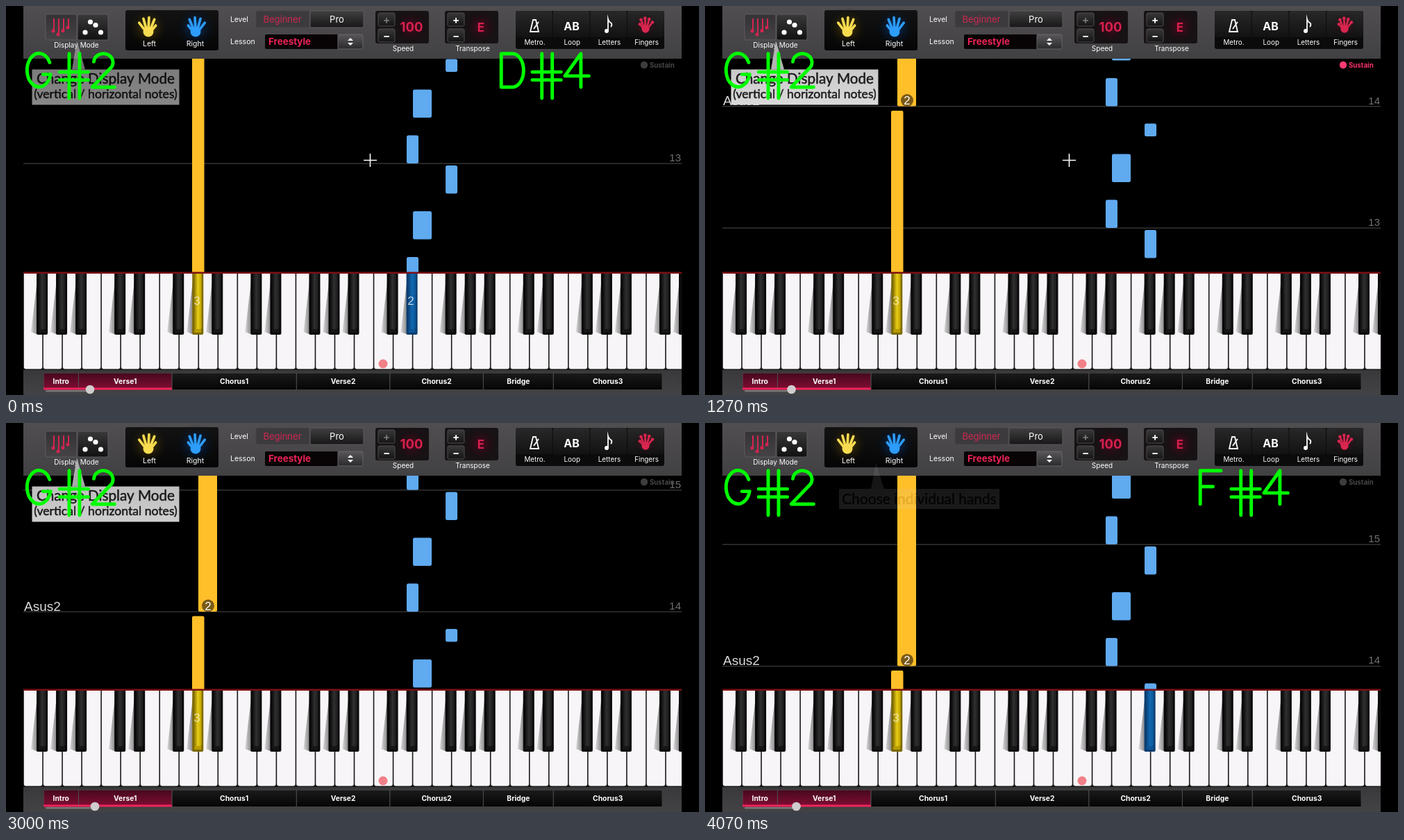
Recreate the animation shown at these times as an HTML page with a canvas. Size 998 px wide and 561 px high, loop 4.14 s.

```html
<!DOCTYPE html>
<html>
<head>
<meta charset="utf-8">
<style>
html, body { margin: 0; width: 100%; height: 100%; overflow: hidden; background: #000; }
canvas { display: block; }
</style>
</head>
<body>
<canvas id="stage" width="998" height="561"></canvas>
<script>
const stage = document.getElementById('stage');
const main = stage.getContext('2d'), layer = stage.cloneNode().getContext('2d');
let c = main;

const LOOP = 4140, STEP = 200 / 3, SPEED = 4.9, BAR = 175.5, HIT = 384, KEY = 28.03;
const PINK = '#ee2357', ORANGE = '#ffbf29', BLUE = '#60aaf0';
const UI = 'Inter, sans-serif', SANS = '"Liberation Sans", Arial, sans-serif', LATO = 'Lato, sans-serif';

// single-stroke letters, 21 units tall, baseline at 0
const GLYPHS = {
  G: 'M17.2-15.5A7.5 10.5 0 1 0 17.8-8H13',
  D: 'M4 0V-21H11A7 10.5 0 0 1 11 0Z',
  E: 'M17-21H4V0H17M4-11H12',
  F: 'M17-21H4V0M4-11H12',
  '#': 'M9-21V7M15.5-21V7M3-9.5H21M3-4.5H21',
  2: 'M4-16A6 5.5 0 1 1 15-12.5L3 0H17',
  4: 'M13 0V-21L3-7H18'
};

// each bar repeats three evenly spaced notes
const notes = [];
for (let bar = 0; bar < 4; bar++) {
  ['D#4', 'E 4', 'F#4'].forEach((name, i) => {
    const h = i === 2 && bar % 2 ? 18.5 : 40.5, black = i !== 1;
    notes.push({
      name, h, black,
      key: 20 + i,
      x: 577 + i * KEY - (black ? 0 : 19),
      w: black ? 17 : 27,
      y: 402.5 - 66 * i - BAR * bar - h,
      finger: bar + i ? '' : '2'
    });
  });
}

const clamp = v => Math.max(0, Math.min(1, v));
const smooth = v => v * v * (3 - 2 * v);

function grad(x0, y0, x1, y1, ...colors) {
  const g = c.createLinearGradient(x0, y0, x1, y1);
  colors.forEach((color, i) => g.addColorStop(i / (colors.length - 1), color));
  return g;
}
const down = (y, h, ...colors) => grad(0, y, 0, y + h, ...colors);

function box(x, y, w, h, fill, r = 0, border) {
  c.beginPath();
  c.roundRect(x, y, w, h, r);
  c.fillStyle = fill;
  c.fill();
  if (border) { c.strokeStyle = border; c.lineWidth = 1; c.stroke(); }
}

function dot(x, y, r, fill) {
  c.beginPath();
  c.arc(x, y, r, 0, 7);
  c.fillStyle = fill;
  c.fill();
}

function shape(d, fill) {
  c.fillStyle = fill;
  c.fill(new Path2D(d));
}

function stroke(d, color, width) {
  c.strokeStyle = color;
  c.lineWidth = width;
  c.stroke(new Path2D(d));
}

function text(s, x, y, size, color = '#fff', align = 'center', weight = '', font = UI) {
  c.font = `${weight} ${size}px ${font}`;
  c.textAlign = align;
  c.fillStyle = color;
  c.fillText(s, x, y);
}

function glow(x, y, r, color) {
  const g = c.createRadialGradient(x, y, 0, x, y, r);
  g.addColorStop(0, color);
  g.addColorStop(1, 'transparent');
  c.fillStyle = g;
  c.fillRect(x - r, y - r, 2 * r, 2 * r);
}

// palm with four fanned fingers and a thumb; a negative scale mirrors it
function hand(x, y, scale, color, tips) {
  c.save();
  c.translate(x, y);
  c.scale(scale, Math.abs(scale));
  c.lineCap = 'round';
  for (let i = 0; i < 5; i++) {
    const a = -2.55 + i * .52, r = i === 4 ? 12 : 16;
    const fx = r * Math.cos(a), fy = 5 + r * 1.1 * Math.sin(a);
    stroke(`M${i * 2.5 - 5} 6L${fx} ${fy}`, color, 3.6);
    if (tips) dot(fx, fy, 3, color);
  }
  c.beginPath();
  c.ellipse(0, 8, 7.5, 7.5, 0, 0, 7);
  c.fillStyle = color;
  c.fill();
  c.restore();
}

function stepper(x, label, caption, size, plusColor) {
  box(x, 7, 77, 47, '#171315', 3);
  glow(x + 52, 30, 26, 'rgba(140,0,42,.5)');
  ['+', '−'].forEach((s, i) => {
    const y = 10 + i * 23;
    box(x + 4, y, 24, 19, down(y, 19, '#393839', '#151515'), 2, '#4c4c4c');
    text(s, x + 16, y + 15, 15, i ? '#fff' : plusColor, 'center', 'bold');
  });
  text(label, x + 52, 37, size, '#d81f4e', 'center', 'bold');
  text(caption, x + 40, 65, 10);
}

function toolbar() {
  box(25, 0, 948, 76, down(0, 76, '#504e51', '#49474a', '#414042'));

  box(57, 12, 45, 37, down(12, 37, '#343234', '#454345'), 2, '#5d5b5d');
  box(103, 12, 44, 37, down(12, 37, '#3a393a', '#111'), 2, '#5d5b5d');
  for (let i = 0; i < 4; i++) {
    const x = 69 + i * 7, y = 36 + 5 * Math.sin(i * 1.6);
    stroke(`M${x} 18V${y}`, '#d42450', 2);
    dot(x - 1, y, 2.5, '#d42450');
    dot(114 + i * 7.5, i === 1 ? 23 : 31 + 7 * Math.cos(i * Math.PI / 1.5), 3.6, '#fff');
  }
  text('Display Mode', 101.5, 60, 10);

  box(172, 6, 134, 58, down(6, 58, '#131313', '#050505'), 3);
  glow(205, 31, 30, 'rgba(180,140,0,.45)');
  glow(273, 31, 30, 'rgba(0,95,220,.5)');
  hand(205, 29, 1, '#f8dc50');
  hand(273, 29, -1, '#2d9cfa');
  text('Left', 206.5, 58, 10.5);
  text('Right', 272.5, 58, 10.5);

  text('Level', 323, 23, 10.3, '#fff', 'left');
  text('Lesson', 323, 55, 10.5, '#fff', 'left');
  box(360, 7, 77, 24, '#3c3a3d', 2, '#484649');
  box(438, 7, 77, 24, down(7, 24, '#414041', '#171717'), 2, '#5d5b5d');
  text('Beginner', 398, 24, 13, '#d02650');
  text('Pro', 476.5, 24, 13);
  box(373, 41, 105, 21, '#080406', 2);
  box(478, 41, 36, 21, down(41, 21, '#59575a', '#2b2a2c'), 2, '#666');
  text('Freestyle', 378, 56, 13.4, PINK, 'left', 'bold');
  shape('M492 50h8l-4-4zM492 53h8l-4 4z', '#fff');

  stepper(532, '100', 'Speed', 18.5, '#777');
  stepper(632, 'E', 'Transpose', 17, '#fff');

  box(734, 7, 214, 55, '#0b0b0b', 3);
  ['Metro.', 'Loop', 'Letters', 'Fingers'].forEach((s, i) => {
    const x = 734 + i * 53.7;
    box(x, 7, 52.7, 38, down(7, 38, '#282828', '#121212'), 2);
    text(s, x + 27.5, 55.5, 9.9);
  });
  stroke('M759 20L755 37H767L763 20ZM760 33L767 23', '#fff', 1.8);
  text('AB', 814.5, 34.5, 16, '#fff', 'center', 'bold');
  stroke('M867 36V19Q868 23 872 25Q873 28 871 30', '#fff', 1.8);
  dot(865, 36, 3, '#fff');
  glow(921, 28, 20, 'rgba(170,0,50,.4)');
  hand(921, 27, -.75, '#d8264f', true);
}

function roll(s) {
  c.save();
  c.beginPath();
  c.rect(25, 76, 948, HIT - 76);
  c.clip();
  for (let bar = 0; bar < 3; bar++) {
    const y = 227 - BAR * bar + s;
    box(25, y - .5, 948, 1.5, '#333');
    text(13 + bar, 972, y - 3, 15, '#707070', 'right', '', SANS);
  }
  text('Asus2', 26, 50 + s, 19, '#ddd', 'left', '', SANS);
  const end = 51.5 + s;
  box(277, -20, 27, end + 20, ORANGE, 2);
  dot(291, end - 8.5, 9, '#7a5a18');
  text('2', 291, end - 2.5, 17, '#fff', 'center', '', SANS);
  box(268, 58 + s, 17.5, 500, ORANGE, 2);
  notes.forEach(n => box(n.x, n.y + s, n.w, n.h, BLUE, 2.5));
  c.restore();

  const pos = s % BAR, on = pos > 47 && pos < 113;
  dot(919, 85, 5.2, on ? '#ff3a70' : '#3d3d3d');
  text('Sustain', 927, 89, 9.7, on ? '#f8326a' : '#474747', 'left', 'bold');
}

function blackKey(x, tone) {
  shape(`M${x + 2} 386L${x - 8} 470L${x + 2} 474Z`, grad(x - 9, 0, x + 2, 0, 'rgba(0,0,0,.08)', 'rgba(0,0,0,.5)'));
  box(x, 386, 16, 88, tone[0], [0, 0, 2, 2]);
  box(x + 2.5, 386, 11, 80, grad(x + 2, 0, x + 14, 0, ...tone), [0, 0, 2, 2]);
  box(x + 3, 466, 10, 5, tone[2], 1);
}

function keyboard(active) {
  box(25, 386, 948, 142, '#171717');
  for (let k = 0; k < 34; k++) {
    const lit = active && !active.black && k === active.key - 1;
    box(25 + k * KEY + .8, 386, KEY - 1.6, 137.5, lit ? down(386, 138, '#1673c4', '#1d8ae6') : '#f7f5f7', [0, 0, 3, 3]);
  }
  for (let k = 1; k < 35; k++) {
    if (k % 7 === 0 || k % 7 === 4) continue;
    const pressed = active && active.black && k === active.key;
    blackKey(25 + k * KEY - 9,
      k === 9 ? ['#7d6a00', '#e8cc18', '#b89d00'] :
      pressed ? ['#0a3e70', '#1268b0', '#0b5596'] : ['#080808', '#303030', '#161616']);
  }
  box(25, 383.5, 948, 2.5, '#7c1016');
  text('3', 275, 431, 17, 'rgba(255,255,255,.65)', 'center', '', SANS);
  if (active) text(active.finger, 583, 431, 17, 'rgba(255,255,255,.75)', 'center', '', SANS);
  dot(543, 516, 6.5, '#f28088');
}

function sections(t) {
  box(25, 525, 948, 36, down(525, 36, '#39383a', '#434244'));
  const bars = { Intro: 4.5, Verse1: 12, Chorus1: 16, Verse2: 12, Chorus2: 12, Bridge: 9, Chorus3: 14 };
  let x = 54;
  for (const name in bars) {
    const w = bars[name] * 11.21, played = x < 200;
    box(x, 529, w, 24, '#59575a');
    box(x + .5, 529.5, w - 1, 23.5, played ? down(529, 24, '#45091d', '#820d34') : down(529, 24, '#1b1b1b', '#050505'));
    text(name, x + w / 2, 545, 10.3, '#fff', 'center', 'bold');
    x += w;
  }
  box(54, 550.5, 185, 3, '#f0245c');
  const knob = 121 + 3.5 * Math.floor((t + 900) / 1400);
  box(57, 554, knob - 57, 2.5, '#777', 1);
  dot(knob, 553, 6.3, '#d0cdce');
}

// drawn on its own layer so that box and text fade as one
function tip(alpha, x, y, w, h, tipX, tipY, rows) {
  if (alpha <= 0) return;
  c = layer;
  c.clearRect(0, 0, 998, 561);
  shape(`M${tipX} ${tipY}L${tipX - 7} ${y}H${tipX + 12}Z`, '#b4b4b4');
  box(x, y, w, h, down(y, h, '#c9c9c9', '#dadada'));
  c.lineWidth = .5;
  c.strokeStyle = '#1c1c1c';
  rows.forEach(([s, ty, size]) => {
    text(s, x + w / 2, ty, size, '#1c1c1c', 'center', '', LATO);
    c.strokeText(s, x + w / 2, ty);
  });
  c = main;
  c.globalAlpha = alpha;
  c.drawImage(layer.canvas, 0, 0);
  c.globalAlpha = 1;
}

function noteName(name, x) {
  [...name].forEach((ch, i) => {
    c.save();
    c.translate(x + i * 47, 117);
    c.scale(2.3, 2.3);
    c.lineCap = c.lineJoin = 'round';
    stroke(GLYPHS[ch] || '', '#0f0', 2.15);
    c.restore();
  });
}

function pointer(t) {
  if (t > 2730) return;
  const p = smooth(clamp((t - 2130) / 400));
  const x = Math.round(524 - 205 * p), y = Math.round(222 + 299 * p);
  c.globalCompositeOperation = 'difference';
  stroke(`M${x - 9} ${y + .5}h19M${x + .5} ${y - 9}v19`, '#fff', 1.6);
  c.globalCompositeOperation = 'source-over';
}

function draw(now) {
  const step = Math.min(61, Math.floor((now % LOOP + 5) / STEP));
  const t = step * STEP, s = step * SPEED;
  const active = notes.find(n => n.y + s < HIT && n.y + n.h + s > HIT);

  box(0, 0, 998, 561, '#000');
  toolbar();
  roll(s);
  keyboard(active);
  sections(t);

  tip(Math.min(clamp(.62 + t / 1000), clamp((3950 - t) / 1000)), 37.5, 91.5, 212, 51, 102, 50, [
    ['Change Display Mode', 112, 20.7],
    ['(vertical / horizontal notes)', 133, 17.6]
  ]);
  tip(clamp((t - 3950) / 1000), 193, 95, 231, 29, 246, 58, [['Choose individual hands', 117, 20.9]]);

  noteName('G#2', 23.3);
  if (active) noteName(active.name, 704);

  box(0, 0, 25, 561, '#000');
  box(973, 0, 25, 561, '#000');
  pointer(t);
}

const start = performance.now();
(function tick() {
  draw(performance.now() - start);
  requestAnimationFrame(tick);
})();
</script>
</body>
</html>
```
